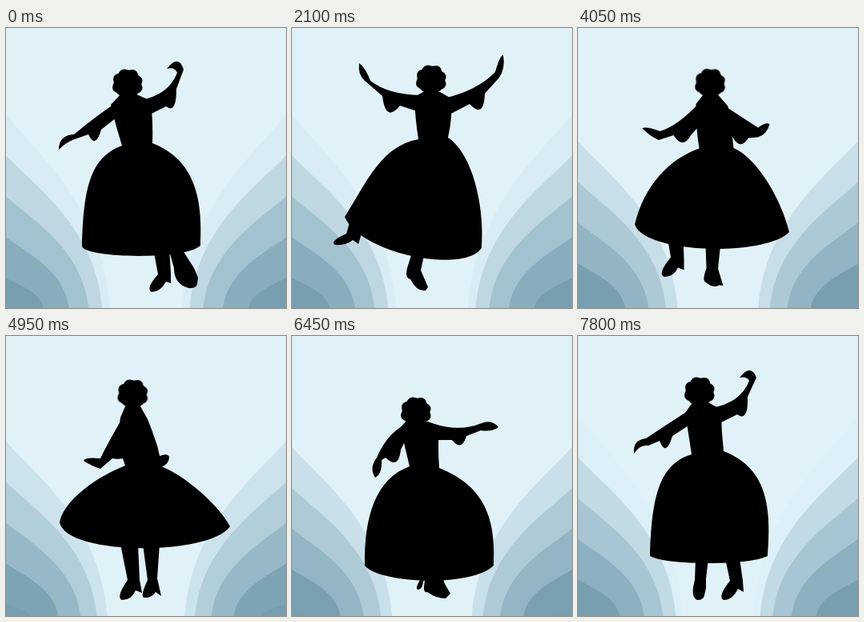
An HTML page without scripts that plays this animation: 350x350 px, repeating every 7950 ms.

```html
<!DOCTYPE html>
<html lang="en">
<head>
<meta charset="utf-8">
<title>Dancer</title>
<style>
@property --rise { syntax: "<number>"; inherits: true; initial-value: 0; }

html, body { margin: 0; width: 100%; height: 100%; overflow: hidden; background: #e1f1f8; }
svg { display: block; width: 100vw; height: 100vh; }

.scene, .dancer > * { animation: 7950ms linear infinite; }
.scene { animation-name: rise; }
.head { animation-name: head; }
.body { animation-name: body; }
.arm-l { animation-name: arm-l; }
.arm-r { animation-name: arm-r; }
.leg-a { animation-name: leg-a; }
.leg-b { animation-name: leg-b; }

/* Each wave grows out of its corner and fades as --u increases */
.wave {
  --u: calc(var(--i) + var(--rise));
  --tint: max(.4, var(--u));
  transform: scale(max(0, 45 + 36 * var(--u) - 3.7 * var(--u) * var(--u)), max(0, 35 + 51 * var(--u)));
  fill: rgb(min(225, 108 + 27 * var(--tint)), min(241, 151 + 21 * var(--tint)), min(248, 169 + 18.5 * var(--tint)));
}

/* Waves repeat every whole unit, so the counter drops back unseen */
@keyframes rise {
  0% { --rise: .05; animation-timing-function: steps(6); }
  11.319% { --rise: 1.2; }
  11.32% { --rise: .2; animation-timing-function: steps(8); }
  26.409% { --rise: 2.05; }
  26.41% { --rise: .05; animation-timing-function: steps(7); }
  39.619% { --rise: 1.2; }
  39.62% { --rise: .2; animation-timing-function: steps(12); }
  62.259% { --rise: 2.6; }
  62.26% { --rise: .6; animation-timing-function: steps(10); }
  81.129% { --rise: 2.45; }
  81.13% { --rise: .45; animation-timing-function: steps(9); }
  98.109% { --rise: 2.2; }
  98.11%, 100% { --rise: .2; }
}

@keyframes head {
  0% { transform: translate(152px, 70px); animation-timing-function: steps(6); }
  11.32% { transform: translate(172px, 91px); animation-timing-function: steps(8); }
  26.41% { transform: translate(174px, 65px); animation-timing-function: steps(7); }
  39.62% { transform: translate(172px, 66px); animation-timing-function: steps(12); }
  62.26% { transform: translate(158.5px, 73px); animation-timing-function: steps(10); }
  81.13% { transform: translate(155px, 95px); animation-timing-function: steps(9); }
  98.11%, 100% { transform: translate(152px, 70px); }
}

@keyframes body {
  0% { d: path("M144 82L131 96Q137 122 145 147C105 162 97 200 95 273C100 288 225 290 243 272C246 215 237 165 183 144Q184 118 181 91L161 82Z"); animation-timing-function: steps(6); }
  11.32% { d: path("M163 106L155 121Q158 142 160 161C115 173 100 210 106 268C125 300 235 300 251 270C262 225 255 175 198 160Q198 138 200 115L182 106Z"); animation-timing-function: steps(8); }
  26.41% { d: path("M164 80L153 86Q154 115 158 139C112 148 96 188 66 236C85 282 215 308 237 275C241 232 229 160 195 137Q201 110 199 88L185 80Z"); animation-timing-function: steps(7); }
  39.62% { d: path("M163 80L152 88Q156 114 154 139C112 153 93 190 75 258C90 290 215 297 248 272C245 220 232 155 195 137Q194 114 198 92L183 80Z"); animation-timing-function: steps(12); }
  62.26% { d: path("M149 88L143 102Q138 132 149 162C115 175 72 205 67 233C75 275 255 275 280 238C262 205 215 170 194 163Q190 135 177 104L168 88Z"); animation-timing-function: steps(10); }
  81.13% { d: path("M142 107L136 114Q141 140 147 163C105 178 90 225 91 287C110 310 225 314 252 287C255 230 242 188 184 165Q182 138 184 112L170 107Z"); animation-timing-function: steps(9); }
  98.11%, 100% { d: path("M144 82L134 96Q138 122 142 148C102 160 92 200 90 275C110 287 215 287 237 275C242 215 237 165 182 144Q179 118 179 92L161 82Z"); }
}

@keyframes arm-l {
  0% { d: path("M140 92Q115 108 85 133Q66 134 66 152Q76 142 86 139L103 133Q112 152 119 127L138 112Z"); animation-timing-function: steps(6); }
  11.32% { d: path("M160 120Q130 135 104 162Q78 168 86 189Q97 184 103 170L115 163Q124 170 130 157L160 138Z"); animation-timing-function: steps(8); }
  26.41% { d: path("M160 84Q120 83 98 66Q92 50 84 44Q82 58 91 66L113 85Q117 119 135 97L156 104Z"); animation-timing-function: steps(7); }
  39.62% { d: path("M156 88Q125 108 87 105Q70 94 64 95Q72 108 84 114L106 115Q120 150 133 115L156 110Z"); animation-timing-function: steps(12); }
  62.26% { d: path("M148 98Q126 136 118 153Q98 151 97 156Q108 163 118 166L133 153Q142 155 150 152L160 120Z"); animation-timing-function: steps(10); }
  81.13% { d: path("M142 110Q118 123 106 152Q96 165 104 177Q113 172 112 155L117 152Q133 168 136 142L143 128Z"); animation-timing-function: steps(9); }
  98.11%, 100% { d: path("M140 92Q115 108 85 128Q68 130 70 147Q78 135 88 137L102 131Q110 152 118 125L138 112Z"); }
}

@keyframes arm-r {
  0% { d: path("M168 90Q203 84 214 56Q211 48 201 51Q216 32 222 52L213 76Q213 108 200 98L180 108Z"); animation-timing-function: steps(6); }
  11.32% { d: path("M188 112Q226 94 229 82Q224 68 231 62Q238 72 236 83L225 108Q217 122 208 118L196 128Z"); animation-timing-function: steps(8); }
  26.41% { d: path("M190 88Q232 78 254 55Q260 34 264 34Q267 50 259 62L241 82Q240 114 222 95L197 108Z"); animation-timing-function: steps(7); }
  39.62% { d: path("M190 88Q225 100 258 99Q270 87 275 90Q268 106 256 109L238 111Q224 142 212 113L195 110Z"); animation-timing-function: steps(12); }
  62.26% { d: path("M172 104Q188 125 192 150Q202 146 204 151Q204 160 194 164L188 164Q182 164 176 162L165 120Z"); animation-timing-function: steps(6); }
  73.58% { d: path("M178 102Q200 80 210 45Q212 25 218 16Q222 32 220 48L212 85Q215 105 203 102L183 115Z"); animation-timing-function: steps(4); }
  81.13% { d: path("M178 110Q210 120 237 109Q250 104 258 114Q250 120 236 118L218 125Q212 145 200 130L182 130Z"); animation-timing-function: steps(9); }
  98.11%, 100% { d: path("M166 90Q203 84 214 56Q211 50 202 52Q216 34 223 52L212 76Q213 108 199 98L179 108Z"); }
}

@keyframes leg-a {
  0% { d: path("M184 275L190 308Q174 326 182 330Q193 330 200 317L206 319L206 306L204 275Z"); animation-timing-function: steps(6); }
  11.32% { d: path("M187 285L191 306Q173 328 182 330Q193 331 200 317L207 319L208 306L203 285Z"); animation-timing-function: steps(8); }
  26.41% { d: path("M149 284L144 300Q141 313 148 314Q156 330 167 328L170 324L161 303L165 284Z"); animation-timing-function: steps(7); }
  39.62% { d: path("M148 284L144 296Q141 309 148 309Q155 324 166 323L169 319L161 299L164 284Z"); animation-timing-function: steps(12); }
  62.26% { d: path("M171 260L177 305Q168 324 172 327Q182 328 187 320L194 325L189 303L192 260Z"); animation-timing-function: steps(10); }
  81.13% { d: path("M163 298L166 306Q163 322 169 320Q180 328 192 328L198 322L190 308L188 298Z"); animation-timing-function: steps(9); }
  98.11%, 100% { d: path("M184 278L190 306Q174 326 182 330Q193 330 200 316L207 320L206 306L202 278Z"); }
}

@keyframes leg-b {
  0% { d: path("M203 275L210 300Q210 320 228 325Q238 326 239 320L240 312L235 300L219 275Z"); animation-timing-function: steps(6); }
  11.32% { d: path("M192 270L193 285Q196 297 200 298Q205 298 206 295L207 292L206 288L205 270Z"); animation-timing-function: steps(8); }
  26.41% { d: path("M72 243L68 257Q46 267 54 271Q68 272 76 265L83 270L86 260L88 250Z"); animation-timing-function: steps(7); }
  39.62% { d: path("M79 255L80 268Q61 288 70 292Q82 293 88 281L95 284L98 274L98 262Z"); animation-timing-function: steps(12); }
  62.26% { d: path("M143 260L152 305Q137 327 145 330Q157 330 162 318L170 321L167 305L165 260Z"); animation-timing-function: steps(10); }
  81.13% { d: path("M158 298L160 305Q153 317 158 317Q162 316 163 312L164 308L165 304L166 298Z"); animation-timing-function: steps(9); }
  98.11%, 100% { d: path("M147 278L146 305Q140 326 149 330Q157 330 158 324L160 315L160 303L163 278Z"); }
}
</style>
</head>
<body>
<svg class="scene" viewBox="0 0 350 350">
  <defs>
    <path id="wave" d="M0 -1C.3 -.8 .93 -.53 1 0L0 0Z"/>
    <g id="waves">
      <use href="#wave" class="wave" style="--i:4"/>
      <use href="#wave" class="wave" style="--i:3"/>
      <use href="#wave" class="wave" style="--i:2"/>
      <use href="#wave" class="wave" style="--i:1"/>
      <use href="#wave" class="wave" style="--i:0"/>
      <use href="#wave" class="wave" style="--i:-1"/>
      <use href="#wave" class="wave" style="--i:-2"/>
      <use href="#wave" class="wave" style="--i:-3"/>
    </g>
  </defs>
  <use href="#waves" transform="translate(0 350)"/>
  <use href="#waves" transform="translate(350 350) scale(-1 1)"/>
  <g class="dancer">
    <path class="leg-a"/>
    <path class="leg-b"/>
    <path class="body"/>
    <path class="arm-l"/>
    <path class="arm-r"/>
    <g class="head">
      <ellipse rx="17.5" ry="17.5"/>
      <circle cx="-11" cy="-6" r="7"/>
      <circle cx="-12" cy="4" r="7"/>
      <circle cx="-4" cy="-11" r="7.5"/>
      <circle cx="6" cy="-11" r="7"/>
      <circle cx="12" cy="-4" r="6.5"/>
      <circle cx="12" cy="5" r="6.5"/>
    </g>
  </g>
</svg>
</body>
</html>
```
